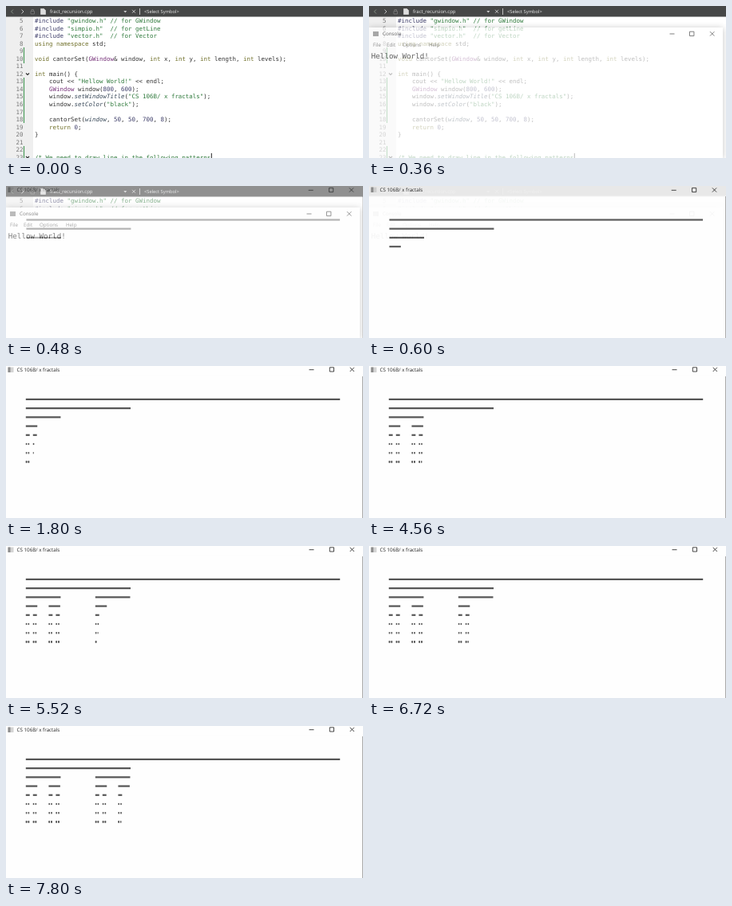
Animation of 447 by 191 pixels, one loop 8 s. Source, as an HTML page:

```html
<!DOCTYPE html>
<html lang="en">
<head>
<meta charset="utf-8">
<title>Cantor set</title>
<style>
  html, body { margin: 0; width: 100%; height: 100%; overflow: hidden; background: #fff; }
  body { text-rendering: geometricPrecision; font-family: "Open Sans", sans-serif; }
  #stage { position: relative; width: 447px; height: 191px; overflow: hidden; }
  svg, pre { position: absolute; left: 0; top: 0; }
  svg { width: 447px; height: 191px; }
  pre { margin: 0; transform: translateY(14.1px); font: 7.48px/9.55px "DejaVu Sans Mono", monospace; color: #333; }
  #numbers { width: 21.5px; text-align: right; color: #777; }
  #code { left: 36px; }
  #code b { font-weight: normal; color: #70702a; }
  #code i { font-style: normal; color: #2f7a3c; }
  #code u { text-decoration: none; color: #753078; }
  #code em { color: #3a4a5a; }
  #code s { text-decoration: none; color: #3c3c68; }
  text { font-size: 6.25px; fill: #222; }
  .toolbar text { font-size: 6px; fill: #eee; }
  .icons { fill: none; stroke: #333; stroke-width: .9; }
  #console, #window { opacity: 0; }
  #console { filter: drop-shadow(0 1px 4px rgba(0, 0, 0, .35)); }
</style>
</head>
<body>
<div id="stage">
  <svg>
    <path d="M0 13h34v178H0z" fill="#efefef"/>
    <path d="M22.5 52v20M22.5 90v57M22.5 176v15" stroke="#4b9a5a" stroke-width="1.2"/>
    <path class="icons" style="stroke-width:1.2" d="M25 84.5l2 2 2-2M25 189l2 2 2-2"/>
    <g class="toolbar">
      <path d="M0 0h447v13.5H0z" fill="#464747"/>
      <g class="icons" style="stroke:#ccc">
        <path d="M9 4.5l-2.5 2.5 2.5 2.5" stroke="#7a857a" style="stroke:#8a938a"/>
        <path d="M19.5 4.5l2.5 2.5-2.5 2.5M158 4.8l4 4m0-4l-4 4M167.5 3v8"/>
        <path d="M31 6.5h4.5v3.5h-4.5zM32 6.5V4.5h2.5v2" style="stroke:#777"/>
        <path d="M43.5 3.5h4l2 2v5h-6z" fill="#ddd"/>
        <path d="M147.3 6h4l-2 2.5z" fill="#ccc" style="stroke:none"/>
      </g>
      <text x="55" y="9.2">fract_recursion.cpp</text>
      <text x="173" y="9.2" style="font-size:5.75px">&lt;Select Symbol&gt;</text>
    </g>
    <path d="M257.3 185v6" stroke="#222"/>
  </svg>
  <pre id="numbers"></pre>
  <pre id="code"><s>#include</s> <i>"gwindow.h"</i> <i>// for GWindow</i>
<s>#include</s> <i>"simpio.h"</i>  <i>// for getLine</i>
<s>#include</s> <i>"vector.h"</i>  <i>// for Vector</i>
<b>using namespace</b> std;

<b>void</b> cantorSet(<u>GWindow</u>&amp; window, <b>int</b> x, <b>int</b> y, <b>int</b> length, <b>int</b> levels);

<b>int</b> main() {
    cout &lt;&lt; <i>"Hellow World!"</i> &lt;&lt; endl;
    <u>GWindow</u> window(<s>800</s>, <s>600</s>);
    window.<em>setWindowTitle</em>(<i>"CS 106B/ x fractals"</i>);
    window.<em>setColor</em>(<i>"black"</i>);

    cantorSet(<em>window</em>, <s>50</s>, <s>50</s>, <s>700</s>, <s>8</s>);
    <b>return</b> <s>0</s>;
}


<i>/* We need to draw line in the following patterns</i></pre>

  <svg id="console">
    <path d="M0 27h443v164H0z" fill="#fff"/>
    <path d="M5 32h7v6H5z" fill="#888"/>
    <text x="17" y="37.2">Console</text>
    <path class="icons" d="M376.5 35h6M401.5 32.2h5.4v5.4h-5.4zM427 32.2l5.4 5.4m0-5.4l-5.4 5.4"/>
    <g opacity=".7">
      <text x="5" y="51.3">File</text><text x="22" y="51.3">Edit</text>
      <text x="42" y="51.3">Options</text><text x="75" y="51.3">Help</text>
    </g>
    <text x="2.8" y="66" style="font:9.2px 'DejaVu Sans Mono',monospace">Hellow World!</text>
  </svg>

  <svg id="window">
    <path d="M0 0h447v191H0z" fill="#fefefe"/>
    <path id="titlebar" d="M0 0h447v12.5H0z" fill="#f0f0f0"/>
    <path d="M2.5 1.5h7v6.5h-7z" fill="#d4d4d4"/>
    <path d="M2.5 1.5h3v6.5h-3z" fill="#8c8c8c"/>
    <text x="13.5" y="7.2">CS 106B/ x fractals</text>
    <path class="icons" id="controls" d="M379.5 4.7h6M405.3 1.8h5.2v5.2h-5.2zM430.7 1.8l5.2 5.2m0-5.2l-5.2 5.2"/>
    <path d="M446.5 13v178" stroke="#aaa"/>
    <g id="lines" fill="#555"></g>
  </svg>
</div>
<script>
const LOOP = 8000, TICK = 120, LAST = 7800;
const SCALE = 393 / 700, LINE_MS = 67.6, FADE_MS = 230;
const $ = id => document.getElementById(id);
const bars = [];

$('numbers').textContent = Array.from({ length: 19 }, (_, i) => i + 5).join('\n');

// Integer lengths, as the program itself computes them
function cantorSet(x, level, length) {
  if (level === 8) return;
  const bar = document.createElementNS('http://www.w3.org/2000/svg', 'rect');
  const attrs = {
    x: 24.8 + (x - 50) * SCALE,
    y: 40.8 + level * 11.22,
    width: Math.max(1, length * SCALE + 0.4),
    height: 2.2
  };
  for (const key in attrs) bar.setAttribute(key, attrs[key]);
  $('lines').append(bar);
  bars.push(bar);
  const third = Math.floor(length / 3);
  cantorSet(x, level + 1, third);
  cantorSet(x + Math.floor(2 * length / 3), level + 1, third);
}
cantorSet(50, 0, 700);

const fadeIn = (t, from) => Math.min(1, Math.max(0, (t - from) / FADE_MS));

function render(time) {
  const t = Math.min(Math.floor(time % LOOP / TICK) * TICK, LAST);
  const count = Math.floor(22.65 + (t - 1800) / LINE_MS);
  bars.forEach((bar, i) => bar.setAttribute('visibility', i < count ? 'inherit' : 'hidden'));

  $('console').style.opacity = fadeIn(t, 200);
  $('window').style.opacity = fadeIn(t, 380);

  const settling = t < 840;
  $('titlebar').setAttribute('fill', settling ? '#f0f0f0' : '#fefefe');
  $('lines').setAttribute('transform', settling ? 'translate(.7 .6) scale(.998 1)' : '');
  $('controls').setAttribute('transform', settling ? 'translate(-.8 .6)' : '');
}

const start = performance.now();
function frame() {
  render(performance.now() - start);
  requestAnimationFrame(frame);
}
frame();
</script>
</body>
</html>
```
